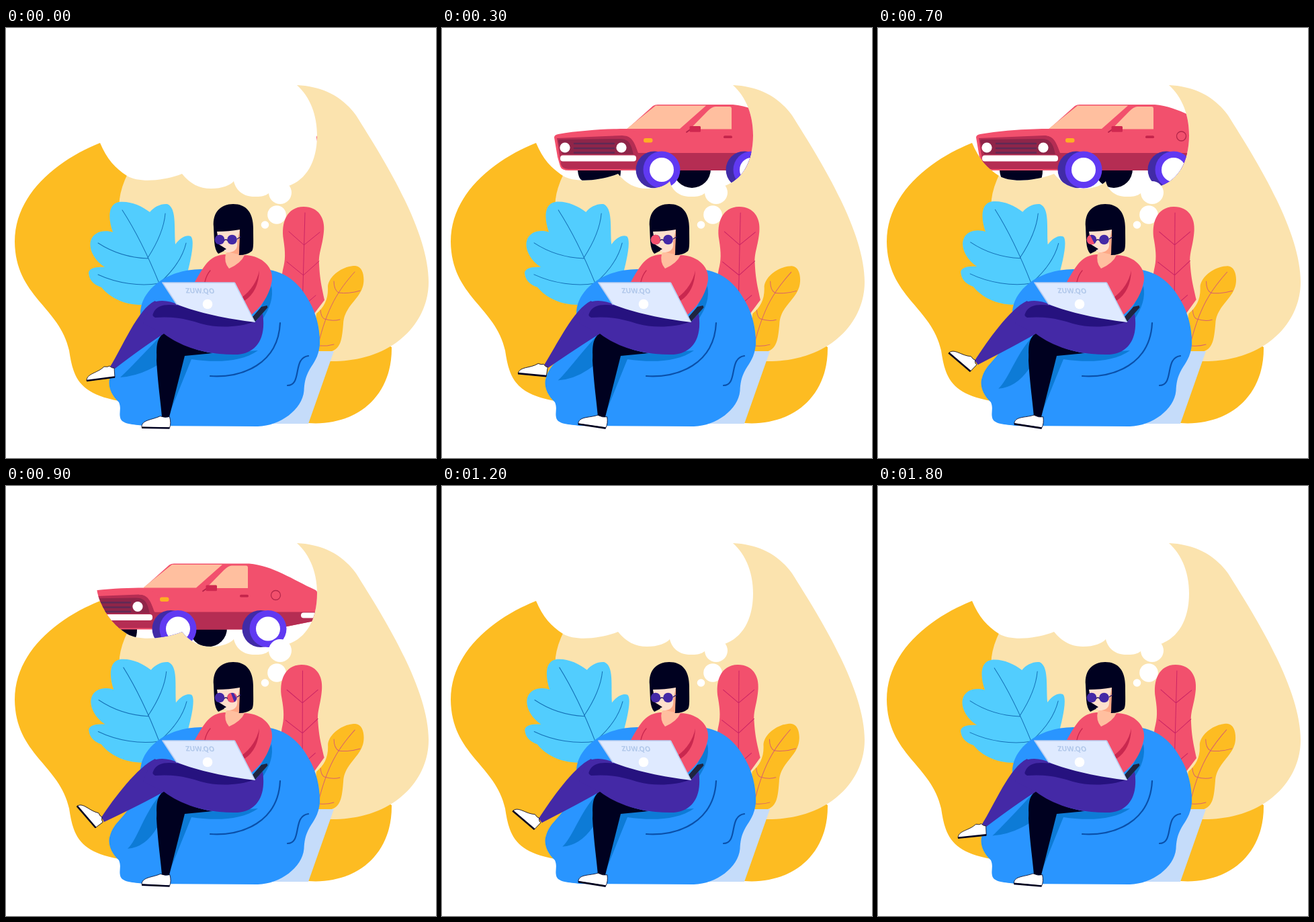
An HTML page for the animation above (1900 ms loop, 640x640 px).

```html
<!DOCTYPE html>
<html lang="en">
<head>
<meta charset="utf-8">
<title>Daydream</title>
<style>
  html, body { margin: 0; width: 100%; height: 100%; overflow: hidden; background: #fff; }
  svg { display: block; width: 100vw; height: 100vh; }
  .line { fill: none; stroke-linecap: round; stroke-linejoin: round; }
  .pink { fill: #f2506d; }
  .wine { fill: #b52d53; }
  .peach { fill: #ffbf9f; }
  .ink { fill: #000120; }
  .lens { fill: #4429a6; }
  .label { font: 700 10.5px "Open Sans", sans-serif; fill: #b0c7ea; }
</style>
</head>
<body>
<svg viewBox="0 0 640 640">
  <defs>
    <path id="cloud" d="M433 85C453 103 463 130 463 160C463 200 446 226 421 235L391 246C386 250 380 251 373 251C357 252 343 245 339 228C334 234 322 239 305 239C288 239 274 232 262 217C240 226 200 232 180 220C163 209 150 195 140 171Q135 160 134 143V100L300 60Z"/>
    <clipPath id="dream"><use href="#cloud"/></clipPath>
    <clipPath id="lensL"><circle cx="318" cy="315" r="7.3"/></clipPath>
    <clipPath id="lensR"><circle cx="336.5" cy="315" r="7.3"/></clipPath>
    <g id="wheel">
      <circle cx="-11" r="27.500" fill="#412ba6"/>
      <circle r="27.500" fill="#6039f2"/>
      <circle r="18" fill="#fff"/>
    </g>
  </defs>

  <!-- backdrop -->
  <path fill="#fdbc22" d="M140 171C80 195 13 245 13 318C14 400 80 415 94 480C100 520 108 544 168 555L450 588C520 593 575 550 574 475L300 300L200 190Z"/>
  <path fill="#fbe3ae" d="M433 85C475 87 503 105 521 130C560 192 629 300 629 378C629 440 575 498 480 496L300 400C220 350 165 290 169 255Q171 237 182 215L400 120Z"/>
  <use href="#cloud" fill="#fff"/>

  <g clip-path="url(#dream)">
    <g id="car">
      <path class="ink" d="M179 205H243V212Q243 227 236 228H188Q180 226 179 212Z"/>
      <circle class="ink" cx="349" cy="210" r="28"/>
      <path class="pink" d="M144 163Q144 159 150 158C185 152 225 150 253 150L291 116Q294 114 298 114H410C445 117 475 138 508 153Q512 155 512 160L509 199L464 208L440 212H166Q155 212 153 206L149 192Z"/>
      <path class="wine" d="M148 164L245 160C262 160 263 173 270 186H511L509 199L464 208L440 212H270V210H165Q156 210 154 203Z"/>
      <path class="pink" d="M253 152C273 153 279 165 281 186H269C264 172 262 160 246 160Z"/>
      <path fill="#8f2549" d="M150 168Q150 166 153 166L242 165C257 165 259 176 262 188H156Z"/>
      <path class="line" stroke="#5f2a55" stroke-width="2.6" d="M174 172H233M174 179H233M174 185.500H233"/>
      <circle cx="160" cy="178" r="7.600" fill="#fff"/>
      <circle cx="244" cy="178" r="7.600" fill="#fff"/>
      <rect x="153" y="189.500" width="113" height="9" rx="4" fill="#fff"/>
      <rect x="487" y="187" width="30" height="8" rx="4" fill="#fff"/>
      <rect x="277" y="164" width="13.500" height="6.500" rx="3" fill="#fdb022"/>
      <path class="peach" d="M252 150L295 115.500H370L331 150Z"/>
      <path class="peach" d="M346 150.500L372 124Q379 117 384 117H405Q408 117 408 120V150.500Z"/>
      <path class="line" stroke="#b52249" stroke-width="1.800" d="M341 155L348 150"/>
      <rect x="345.500" y="146" width="16.500" height="8.800" rx="1.500" fill="#cf2850"/>
      <rect x="396" y="160.300" width="13" height="3.800" rx="1.900" fill="#c4244b"/>
      <circle class="line" cx="449.500" cy="161" r="7" stroke="#b5264a" stroke-width="1.300"/>
      <use href="#wheel" x="304" y="211"/>
      <use href="#wheel" x="438" y="211"/>
    </g>
  </g>
  <g fill="#fff">
    <circle cx="408" cy="245" r="17"/>
    <circle cx="403" cy="278" r="13.800"/>
    <circle cx="385.500" cy="293" r="5.800"/>
  </g>

  <!-- plants -->
  <g id="blueLeaf">
    <path fill="#52cdfe" d="M205 412C178 413 155 402 142 386C130 382 124 375 123 365C123 358 133 355 147 356C130 345 123 328 126 317C130 302 148 300 159 304C152 285 151 262 168 259C184 257 201 264 214 274C220 266 231 261 240 262C254 268 250 295 252 322C258 314 267 307 275 310C282 316 274 350 268 372L230 412Z"/>
    <path class="line" stroke="#1470b6" stroke-width="1" d="M173 271C195 305 213 343 228 380M237 276C235 300 222 325 211 342M137 320C160 335 185 342 211 343M137 367C165 380 200 385 228 380C245 365 262 345 268 320"/>
  </g>
  <g id="pinkLeaf">
    <path class="pink" d="M443 266C465 266 475 283 473 303C471 325 465 335 466 350C467 375 470 385 474 405L455 430L405 400L412 360C416 345 416 335 413 315C409 290 418 266 443 266Z"/>
    <path class="line" stroke="#cb2464" stroke-width="1" d="M445 275L441 420M421 303L443.500 323L467 304M418 348L442.500 368L466 347M461 398L441 415"/>
  </g>
  <g id="goldLeaf">
    <path fill="#fdbc22" d="M520 354C533 355 534 375 531 385C525 405 503 415 502 440C500 465 498 478 482 482H455L462 425C474 415 480 403 479 385C480 370 500 354 520 354Z"/>
    <path class="line" stroke="#d8626a" stroke-width="1" d="M519 363C495 390 478 415 464 474M488 377Q488 390 495 394Q510 396 527 391M468 420Q469 431 474 433Q487 437 497 434M467 473Q478 474 488 471"/>
  </g>
  <path fill="#c5dcfa" d="M440 481H488L450 589H380Z"/>

  <!-- beanbag -->
  <path fill="#2995ff" d="M200 425C200 390 240 359 290 359H385C420 362 440 385 452 408C462 425 468 450 467 472C465 490 458 498 452 508C445 520 444 530 443.500 540C441 568 408 592 375 593L205 592C190 590 172 590 170 580C168 572 172 566 168 557C155 545 151 530 155 520C160 500 182 490 190 465Z"/>
  <g fill="#0d7bd6">
    <path id="shade"/>
    <path d="M243 575L266 487L375 480C350 498 310 498 276 493C265 520 255 545 243 575Z"/>
    <path d="M395 384Q400 408 380 436L372 430Z"/>
  </g>
  <path class="line" stroke="#0a50aa" stroke-width="2.200" d="M304 518C352 521 405 500 408 439M450 488C426 491 441 532 419 532"/>

  <!-- woman -->
  <path class="pink" d="M325 337C304 339 297 350 281 378L340 380L364 428C386 410 393 392 396 375C398 352 376 338 355 338Z"/>
  <path class="line" stroke="#c9284f" stroke-width="1.300" d="M304 361Q298 368 296 378"/>
  <path fill="#c9284f" d="M377 361Q372 385 351 401L355 406Q376 392 377 361Z"/>
  <path class="peach" d="M327 336Q324 349 332 358Q350 350 355 338L347 334V318Z"/>
  <path class="ink" d="M309 296C307 274 320 262 338 262C358 262 368 275 368 298C368 318 369 328 366 332Q359 338 347 338L336 320L328 330L316 336Q311 331 310 318Z"/>
  <path fill="#ffe0cc" d="M314 303Q332 303 348 300L347 325Q343 335 329 334L324 331L328 329L317 322Z"/>
  <path fill="#fda886" d="M348 300L347 337L333 334Q346 332 344 318Z"/>
  <circle class="lens" cx="318" cy="315" r="7.300"/>
  <circle class="lens" cx="336.500" cy="315" r="7.300"/>
  <g clip-path="url(#lensL)"><path id="glintL" class="pink" d="M300 300H311L322 322L320 330H300Z"/></g>
  <g clip-path="url(#lensR)"><path id="glintR" class="pink" fill-rule="evenodd" d="M325 300H348V330H325ZM334 306L338 307L344 317L340 322Z"/></g>
  <path class="line" stroke="#251768" stroke-width="1.300" d="M325 316Q327 314 329.500 316M344 314L349 311"/>

  <path class="ink" d="M237 453C221 462 225 480 224 495C226 530 230 555 232 579H243L266 488L308 484C280 480 260 470 237 453Z"/>
  <g id="shoeR">
    <path fill="#fff" stroke="#000120" stroke-width=".8" d="M202 595C201 584 217 584 229 578Q237 581 243 578.500Q246 588 243.500 595Z"/>
    <path fill="none" stroke="#000120" stroke-width="2.600" d="M202 595.500H243.500"/>
  </g>

  <path id="calf" fill="#4429a6"/>
  <path fill="#4429a6" d="M216 410C226 404 243 405 256 412L371 437L382 425C388 465 370 484 345 486C310 487 268 480 235 455L204 440Z"/>
  <path fill="#26127f" d="M219 425C224 411 240 411 256 413L371 437C345 446 315 447 290 440C265 432 245 429 222 431Q217 429 219 425Z"/>
  <g id="shoeL">
    <path fill="#fff" stroke="#000120" stroke-width=".8" d="M120 525C120 514 136 514 146 504Q152 505 154 503Q158 507 161 506L162 520Z"/>
    <path fill="none" stroke="#000120" stroke-width="2.600" d="M120 525L162 519.500"/>
  </g>

  <path fill="#1f2540" d="M366 431L380 415L388.500 413L389.500 416L371 437Z"/>
  <path fill="#dfeaff" d="M233 379H341L371 438C330 433 285 424 254 411Z"/>
  <path class="line" stroke="#b9cdf0" stroke-width="1.600" d="M254 411L233 379H340L370 437"/>
  <text class="label" transform="translate(268 394.500) rotate(1) skewX(10)">ZUW.QO</text>
  <circle cx="300" cy="411" r="7.300" fill="#fff"/>
</svg>
<script>
  const LOOP = 1900, STEP = 100, TAU = Math.PI * 2;
  const $ = id => document.getElementById(id);
  const set = (id, name, value) => $(id).setAttribute(name, value);
  const turn = (id, deg, x, y) => set(id, 'transform', `rotate(${deg} ${x} ${y})`);
  const swing = (t, period = LOOP) => (1 - Math.cos(TAU * t / period)) / 2;

  // Front wheel x at every step: glide in, pause, rush out.
  const carX = [622, 490, 376, 327, 310, 304, 303, 306, 300, 256, 175, 60, -100];

  function draw(t) {
    const s = swing(t);
    const step = t / STEP;
    const x = carX[step] ?? -300;

    set('car', 'transform', `translate(${x - 304} ${t >= 900 ? 1.5 : 0})`);
    set('glintL', 'transform', `translate(${(x - 304) * 0.3})`);
    set('glintR', 'visibility', t >= 900 && t <= 1100 ? 'visible' : 'hidden');

    turn('blueLeaf', swing(t + LOOP - 100), 228, 380);
    turn('pinkLeaf', -1.4 * s, 440, 420);
    turn('goldLeaf', 0.45 * Math.sin(TAU * t / LOOP), 470, 480);

    const ax = 155 - 13 * s, ay = 504 - 11 * s;
    set('calf', 'd', `M${ax} ${ay}C${ax + 18} ${ay - 28} 196 418 222 406L245 440L235 455` +
      `Q205 ${474 - 2 * s} ${162 - 16 * s} ${507 - 7 * s}Z`);
    set('shoeL', 'transform',
      `translate(${-16 * s} ${-7.5 * s}) rotate(${57 * s} 159 506)`);
    const tx = 170 + 11 * s, ty = 520 + 20 * s;
    set('shade', 'd', `M${tx} ${ty}C${tx + 16} ${ty - 15} 205 485 235 453L230 499` +
      `Q${tx + 30} ${ty - 2} ${tx} ${ty}Z`);
    turn('shoeR', 1 + 8 * swing(t - 20, LOOP / 4), 243, 597);
  }

  function tick() {
    draw(Math.floor(performance.now() % LOOP / STEP) * STEP);
    requestAnimationFrame(tick);
  }
  tick();
</script>
</body>
</html>
```
